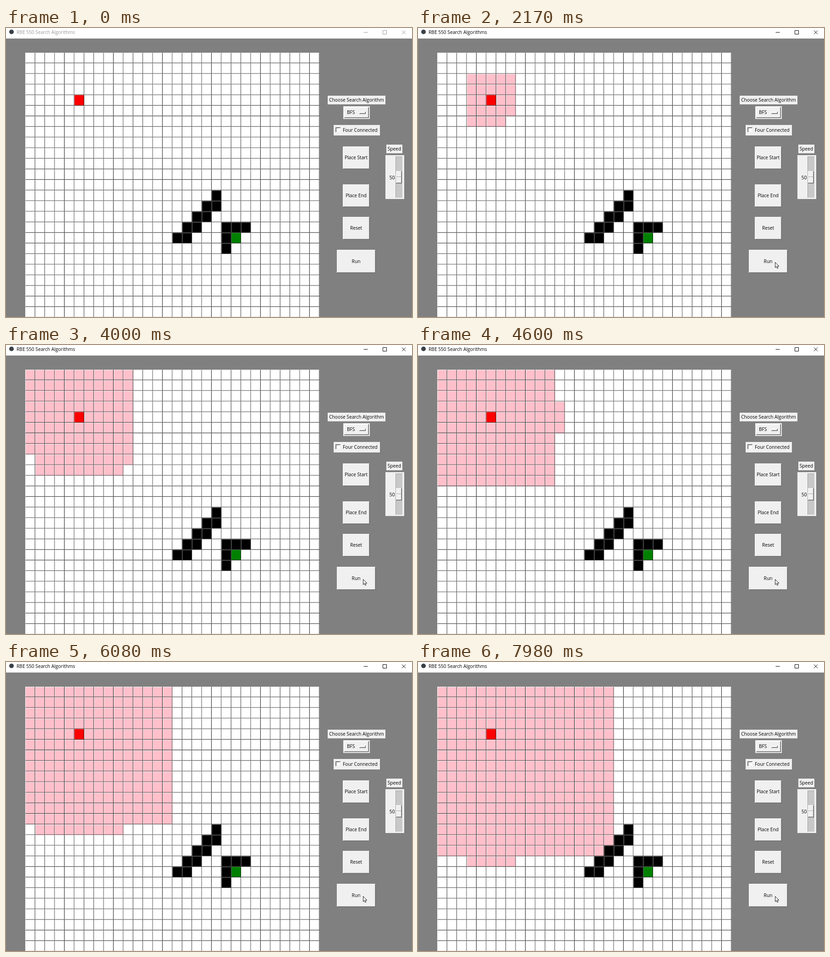
An HTML page with a canvas that plays this animation: 886x632 px, repeating every 8 s.

```html
<!DOCTYPE html>
<html lang="en">
<head>
<meta charset="utf-8">
<title>Search Algorithms</title>
<style>
  html, body { margin: 0; width: 100%; height: 100%; overflow: hidden; background: #808080; }
  canvas, svg { position: absolute; left: 0; top: 0; width: 886px; height: 632px; display: block; }
  text { font: 10.2px "Open Sans", "Noto Sans", sans-serif; fill: #000; }
  rect { shape-rendering: crispEdges; }
</style>
</head>
<body>
<canvas id="grid" width="886" height="632"></canvas>
<svg id="ui" width="886" height="632" viewBox="0 0 886 632"></svg>
<script>
const LOOP = 8000, PRESS = 1430, RELEASE = 1660;
const COLS = 30, ROWS = 25, X0 = 42.4, Y0 = 54, CW = 21.4, CH = 23.17, PX = 0.89;
const START = [5, 4], END = [21, 17];
const WALLS = [[19, 13], [18, 14], [19, 14], [17, 15], [18, 15], [16, 16], [17, 16], [15, 17], [16, 17],
  [20, 16], [21, 16], [22, 16], [20, 17], [20, 18]];
const STEPS = [[0, -1], [1, 0], [0, 1], [-1, 0], [-1, -1], [1, -1], [-1, 1], [1, 1]];

// [time, cells visited] and [time, x, y]
const PACE = [[1660, 1], [2170, 23.2], [2910, 55.2], [4000, 106.2], [5210, 163.2], [6920, 243.2], [8000, 292]];
const PATH = [[290, 822, 630], [1070, 792, 527], [1250, 779, 512], [8000, 779, 512]];

// fill, highlight, shade
const SKIN = {
  open: ['#fff', '#fff', '#999'],
  seen: ['#ffc0cb', '#fff', '#99737a'],
  wall: ['#000', '#6a6a6a', '#404040'],
  start: ['#f00', '#ff4040', '#900'],
  end: ['#008000', '#409040', '#004d00']
};

const key = (c, r) => r * COLS + c;
const base = new Array(COLS * ROWS).fill('open');
WALLS.forEach(p => base[key(...p)] = 'wall');
base[key(...START)] = 'start';
base[key(...END)] = 'end';

function search() {
  const queue = [START], known = new Set([key(...START)]);
  for (let i = 0; i < queue.length; i++) {
    for (const [dx, dy] of STEPS) {
      const c = queue[i][0] + dx, r = queue[i][1] + dy, k = key(c, r);
      if (c < 0 || r < 0 || c >= COLS || r >= ROWS || known.has(k) || base[k] === 'wall') continue;
      known.add(k);
      queue.push([c, r]);
    }
  }
  return queue.slice(1).map(p => key(...p));
}
const order = search();

function sample(table, t) {
  let i = 1;
  while (i < table.length - 1 && t > table[i][0]) i++;
  const a = table[i - 1], b = table[i];
  const u = Math.min(1, Math.max(0, (t - a[0]) / (b[0] - a[0])));
  return a.slice(1).map((v, j) => v + (b[j + 1] - v) * u);
}

const ctx = document.getElementById('grid').getContext('2d');
function box(color, x, y, w, h) {
  ctx.fillStyle = color;
  ctx.fillRect(x, y, w, h);
}

function drawGrid(count) {
  const cells = base.slice();
  for (let i = 0; i < count; i++) cells[order[i]] = 'seen';
  box('#808080', 0, 0, 886, 632);
  box('#fff', X0, Y0, COLS * CW, 632);
  const each = paint => cells.forEach((kind, k) =>
    paint(SKIN[kind], X0 + k % COLS * CW, Y0 + Math.floor(k / COLS) * CH));
  each(([fill], x, y) => box(fill, x, y, CW, CH));
  each(([, light, dark], x, y) => {
    const right = x + CW - PX, low = y + CH - PX;
    box(light, x, y, CW - PX, PX);
    box(light, x, y, PX, CH - PX);
    ctx.globalAlpha = 0.6;
    box(dark, right - PX, y + PX, PX, CH - 2 * PX);
    box(dark, x + PX, low - PX, CW - 2 * PX, PX);
    ctx.globalAlpha = 1;
    box('#262626', right, y, PX, CH);
    box('#262626', x, low, CW, PX);
  });
}

const ui = document.getElementById('ui');
function add(tag, attrs, parent = ui) {
  const el = document.createElementNS('http://www.w3.org/2000/svg', tag);
  for (const name in attrs) el.setAttribute(name, attrs[name]);
  return parent.appendChild(el);
}
const rect = (x, y, width, height, fill, parent) => add('rect', { x, y, width, height, fill }, parent);
function label(str, x, y, anchor = 'start', parent = ui) {
  const el = add('text', { x, y, 'text-anchor': anchor }, parent);
  el.textContent = str;
  return el;
}
// Layers from the outside in: outer dark, outer light, inner dark, face
function bevel(x, y, w, h, [dark, light, shade], parent) {
  rect(x, y, w, h, dark, parent);
  rect(x, y, w - 1, h - 1, light, parent);
  rect(x + 1, y + 1, w - 2, h - 2, shade, parent);
  rect(x + 1, y + 1, w - 3, h - 3, '#f0f0f0', parent);
}
const RAISED = ['#696969', '#fff', '#a0a0a0'];
const SUNKEN = ['#fff', '#696969', '#e3e3e3'];
function button(str, x, y, w, h, style = RAISED, shift = 0) {
  const g = add('g', {});
  bevel(x, y, w, h, style, g);
  label(str, x + w / 2 - 0.5 + shift, y + h / 2 + 3.2 + shift, 'middle', g);
  return g;
}

// Title bar
rect(0, 0, 886, 23, '#fff');
add('circle', { cx: 12, cy: 8.5, r: 5, fill: '#3a4047' });
const title = label('RBE 550 Search Algorithms', 23, 12.8);
const caption = add('path', {
  d: 'M780.5 9.5h9M822.5 5.5h8v8h-8zM864 5.5l8 8M872 5.5l-8 8', fill: 'none', 'stroke-width': 1
});

// Side panel
rect(702, 148, 126, 19, '#f0f0f0');
label('Choose Search Algorithm', 765, 160.8, 'middle');
rect(736, 171, 58, 28, '#f0f0f0');
bevel(738, 173, 54, 24, RAISED);
label('BFS', 744, 188.4);
bevel(771, 183, 14, 5, RAISED);
rect(715, 212, 101, 23, '#f0f0f0');
bevel(719, 217, 12, 12, ['#fff', '#808080', '#e3e3e3']);
rect(720, 218, 9, 1, '#696969');
rect(720, 218, 1, 9, '#696969');
rect(721, 219, 8, 8, '#fff');
label('Four Connected', 735, 226.8);
button('Place Start', 735, 259, 59, 50);
button('Place End', 735, 342, 59, 50);
button('Reset', 735, 413, 59, 50);
const up = button('Run', 722, 485, 85, 51);
const down = button('Run', 722, 485, 85, 51, SUNKEN, 1);
rect(830, 255, 35, 19, '#f0f0f0');
label('Speed', 847.5, 268, 'middle');
rect(828, 278, 41, 96, '#f0f0f0');
rect(850, 281, 15, 90, '#a0a0a0');
rect(851, 282, 14, 89, '#c8c8c8');
bevel(851, 313, 13, 27, RAISED);
rect(852, 325, 10, 1, '#a0a0a0');
rect(852, 326, 10, 1, '#fff');
label('50', 848.5, 331, 'end');

const cursor = add('path', {
  d: 'M.5 .5V12L3.2 9.6 5 13.7 6.8 12.9 5 8.9H8.8Z', fill: '#fff', stroke: '#000', 'stroke-width': 0.9
});

let shown = -1;
function render(t) {
  const count = t < RELEASE ? 0 : Math.floor(sample(PACE, t)[0]);
  if (count !== shown) drawGrid(shown = count);
  const pressed = t >= PRESS && t < RELEASE;
  up.style.display = pressed ? 'none' : '';
  down.style.display = pressed ? '' : 'none';
  title.style.fill = t < PRESS ? '#999' : '#000';
  caption.style.stroke = t < PRESS ? '#999' : '#000';
  const [x, y] = sample(PATH, t);
  cursor.style.display = t < 290 ? 'none' : '';
  cursor.setAttribute('transform', `translate(${Math.round(x)} ${Math.round(y)})`);
}

const began = performance.now();
function tick() {
  render((performance.now() - began) % LOOP);
  requestAnimationFrame(tick);
}
tick();
</script>
</body>
</html>
```
